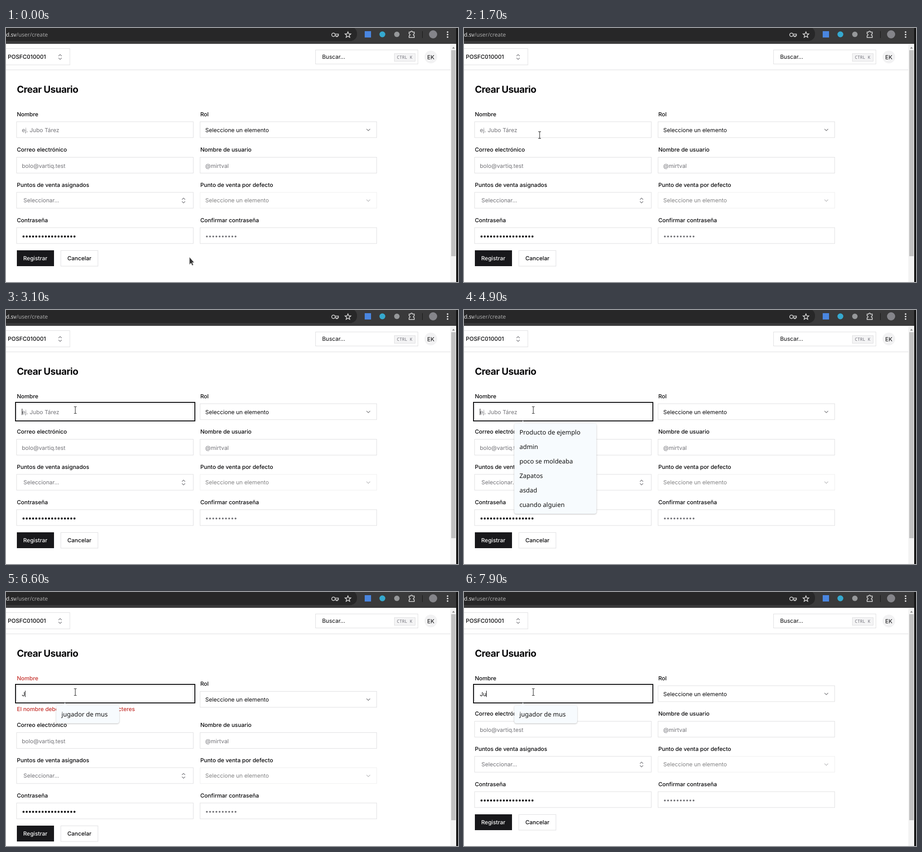
An HTML page that plays this animation: 998 by 561 pixels, repeating every 8 s.

```html
<!DOCTYPE html>
<html lang="es">
<head>
<meta charset="utf-8">
<title>Crear Usuario</title>
<style>
  html, body { margin: 0; height: 100%; overflow: hidden; background: #fff; }
  svg { display: block; width: 998px; height: 561px; }
  text { font: 12.4px Inter, sans-serif; fill: #09090b; text-rendering: geometricPrecision; white-space: pre; }
  .label, .error { font-weight: 500; }
  .title { font-size: 21.1px; font-weight: 700; letter-spacing: -.025em; }
  .hint { fill: #737378; }
  .error { fill: #c5322d; }
  .white { fill: #fafafa; font-weight: 500; }
  .menu { font: 13.75px "Noto Sans", sans-serif; fill: #101010; }
  .url { font: 12.15px "Noto Sans", sans-serif; fill: #a9a9a9; }
  .kbd { font: 9.6px "Noto Sans Mono", monospace; fill: #71717a; }
  .box { fill: #fff; stroke: #dedee0; }
  .line { fill: none; stroke: #77777c; stroke-width: 1.2; }
  .icon { fill: none; stroke: #dcdcdc; stroke-width: 1.5; }
  .popup { filter: drop-shadow(0 1px 1.5px #0004); fill: #f7fbfe; }
</style>
</head>
<body>
<svg id="stage" viewBox="0 0 998 561"></svg>
<script>
const stage = document.getElementById('stage');
const LEFT = 23.5, RIGHT = 428.5;

const text = (x, y, s, cls = '') => `<text x="${x}" y="${y}" class="${cls}">${s}</text>`;
const rect = (x, y, w, h, attrs) => `<rect x="${x}" y="${y}" width="${w}" height="${h}" ${attrs}/>`;
const circle = (x, y, r, fill) => `<circle cx="${x}" cy="${y}" r="${r}" fill="${fill}"/>`;
const path = (d, attrs) => `<path d="${d}" ${attrs}/>`;
const group = (id, ...parts) => `<g id="${id}">${parts.join('')}</g>`;
const box = (x, y, w, h) => rect(x, y, w, h, 'class="box"');
const chevron = (x, y) => path(`M${x - 4} ${y - 2}l4 4 4-4`, 'class="line"');
const sorter = (x, y) => path(`M${x - 3.5} ${y - 2}l3.5-3.5 3.5 3.5M${x - 3.5} ${y + 2}l3.5 3.5 3.5-3.5`, 'class="line"');
const dots = (x, y, n, r, fill) => Array.from({ length: n }, (_, i) => circle(x + 7.03 * i, y, r, fill)).join('');

const field = (x, y, label, inner = '') =>
  text(x + .5, y - 12.5, label, 'label') + box(x, y, 390, 35) + inner;
const input = (x, y, label, hint) => field(x, y, label, text(x + 11.5, y + 23, hint, 'hint'));
const select = (x, y, label) =>
  field(x, y, label, text(x + 11.5, y + 22.5, 'Seleccione un elemento') + chevron(x + 371.5, y + 18));

const popup = (id, w, items) => {
  const h = 7.5 + 32 * items.length;
  return group(id,
    path(`M124 250.5l6-6 6 6H${106 + w}q5 0 5 5v${h - 10}q0 5-5 5H116q-5 0-5-5v-${h - 10}q0-5 5-5z`, 'class="popup"'),
    ...items.map((s, i) => text(122.5, 275 + 32 * i, s, 'menu')));
};

const toolbar = group('toolbar',
  rect(0, 0, 998, 35, 'fill="#3a3a3b"'),
  rect(-20, -3, 795, 32, 'rx="15" fill="#272728"'),
  text(0, 18.5, '<tspan fill="#ededed">d.sv</tspan>/user/create', 'url'),
  '<circle cx="723" cy="15" r="3.8" class="icon"/>',
  path('M727 13.5h7v3.5h-2v2h-3v-2h-2', 'class="icon"'),
  path('M755 8.5l1.8 4.2 4.6.4-3.5 3 1.1 4.5-4-2.4-4 2.4 1.1-4.5-3.5-3 4.6-.4z', 'class="icon"'),
  rect(792, 7, 14, 14, 'fill="#4a86e0"'),
  circle(831, 14, 6.5, '#35a9cf'),
  circle(863, 14, 6, '#96989a'),
  path('M890 9h3.5q0-2 2-2t2 2h4v4q-2 0-2 2t2 2v4h-11.5v-4q2 0 2-2t-2-2z', 'class="icon"'),
  rect(919, 7, 1, 15, 'fill="#161616"'),
  circle(943, 14, 9, '#85858a'),
  [9, 14.5, 20].map(y => circle(975, y, 1.7, '#eee')).join(''));

const header = group('header',
  box(-5, 45.5, 146, 36), text(4, 68, 'POSFC010001', 'label'), sorter(119.5, 64),
  box(683.5, 48.5, 226, 31), text(698, 68, 'Buscar...'),
  rect(857.5, 56.5, 46, 17, 'fill="#f4f4f5" stroke="#dedee0"'), text(863, 67.5, 'CTRL K', 'kbd'),
  circle(938, 64, 14, '#f2f2f3'), text(930, 68.5, 'EK'),
  rect(0, 92, 981, 1, 'fill="#dcdcde"'),
  rect(981, 36, 13, 525, 'fill="#f3f3f3"'), rect(983, 49, 10, 455, 'fill="#c1c1c1"'),
  path('M985 45.5l3-4 3 4z', 'fill="#888"'),
  rect(994, 0, 4, 561, 'fill="#141414"'));

const lowerRows = group('lower',
  input(LEFT, 285.5, 'Correo electrónico', 'bolo@vartiq.test'),
  input(RIGHT, 285.5, 'Nombre de usuario', '@mirtval'),
  field(LEFT, 363, 'Puntos de venta asignados', text(38.5, 385, 'Seleccionar...', 'hint') + sorter(392, 381)),
  text(429, 350.5, 'Punto de venta por defecto', 'label'),
  `<g opacity=".5">${box(RIGHT, 363, 390, 35) + text(440, 385, 'Seleccione un elemento') + chevron(800, 381)}</g>`,
  field(LEFT, 441, 'Contraseña', dots(38.7, 460.5, 17, 2.2, '#09090b')),
  field(RIGHT, 441, 'Confirmar contraseña', dots(443.5, 460.5, 10, 2, '#737378')),
  rect(24, 491, 82, 35, 'fill="#18181b"'), text(38, 513, 'Registrar', 'white'),
  box(121, 491.5, 82, 34.5), text(135.5, 513, 'Cancelar', 'label'));

stage.innerHTML = toolbar + header +
  text(24, 143, 'Crear Usuario', 'title') +
  group('name', input(LEFT, 207, 'Nombre', 'ej. Jubo Tárez')) +
  group('role', select(RIGHT, 207, 'Rol')) +
  lowerRows +
  group('error', text(24, 262.5, 'El nombre debe tener al menos 2 caracteres', 'error')) +
  group('ring', rect(21, 204, 396, 41, 'fill="none" stroke="#09090b" stroke-width="2"')) +
  group('caret', rect(0, 218, 1, 14, 'fill="#09090b"')) +
  popup('fullMenu', 181.5, ['Producto de ejemplo', 'admin', 'poco se moldeaba', 'Zapatos', 'asdad', 'cuando alguien']) +
  popup('shortMenu', 139, ['jugador de mus']) +
  group('arrow', path('M0-1V15.5L3.6 12 6 17.5 8.6 16.3 6.2 11H10.5z', 'fill="#343434" stroke="#d8d8d8" stroke-width=".8"')) +
  group('beam', path('M-3-7.5h2q1 0 1 1v13q0 1-1 1h-2M3-7.5h-2q-1 0-1 1v13q0 1 1 1h2', 'fill="none" stroke="#333" stroke-width="1.2"'));

const $ = id => document.getElementById(id);
const [nameLabel, nameValue] = $('name').querySelectorAll('text');
const show = (id, on) => $(id).setAttribute('visibility', on ? 'visible' : 'hidden');
const move = (id, x, y) => $(id).setAttribute('transform', `translate(${x} ${y})`);

// Pointer track: time, x, y
const track = [[0, 405, 507], [400, 405, 507], [1000, 238, 328], [1300, 195, 270],
  [1800, 160, 228], [2300, 160, 228], [2900, 153, 221], [8000, 153, 221]];
function pointerAt(t) {
  const i = track.findIndex(k => k[0] > t);
  const [t0, x0, y0] = track[i - 1], [t1, x1, y1] = track[i];
  const k = (t - t0) / (t1 - t0);
  return [x0 + (x1 - x0) * k, y0 + (y1 - y0) * k];
}

const FOCUS = 3000, MENU = 3900, FIRST_KEY = 6500, SECOND_KEY = 7800;

// Every click or key press restarts the caret's blink.
function caretVisible(t) {
  const last = [SECOND_KEY, FIRST_KEY, MENU, FOCUS].find(time => t >= time);
  return (t - last) % 1000 < 500;
}

function draw() {
  const t = Math.floor(performance.now() % 8000 / 100) * 100;
  const typed = t >= SECOND_KEY ? 'Ju' : t >= FIRST_KEY ? 'J' : '';
  const invalid = typed === 'J';

  const [x, y] = pointerAt(t);
  const overInput = [207, 285, 441].some(top => y >= top && y <= top + 35);
  show('beam', overInput);
  show('arrow', !overInput);
  move('beam', x, y);
  move('arrow', x, y);

  nameLabel.setAttribute('class', invalid ? 'error' : 'label');
  nameValue.textContent = typed || 'ej. Jubo Tárez';
  nameValue.setAttribute('class', typed ? '' : 'hint');
  show('error', invalid);
  move('role', 0, invalid ? 12.5 : 0);
  move('lower', 0, invalid ? 25 : 0);

  show('ring', t >= FOCUS);
  show('caret', caretVisible(t));
  move('caret', 35 + 7 * typed.length, 0);
  show('fullMenu', t >= MENU && !typed);
  show('shortMenu', typed);
  requestAnimationFrame(draw);
}
draw();
</script>
</body>
</html>
```
